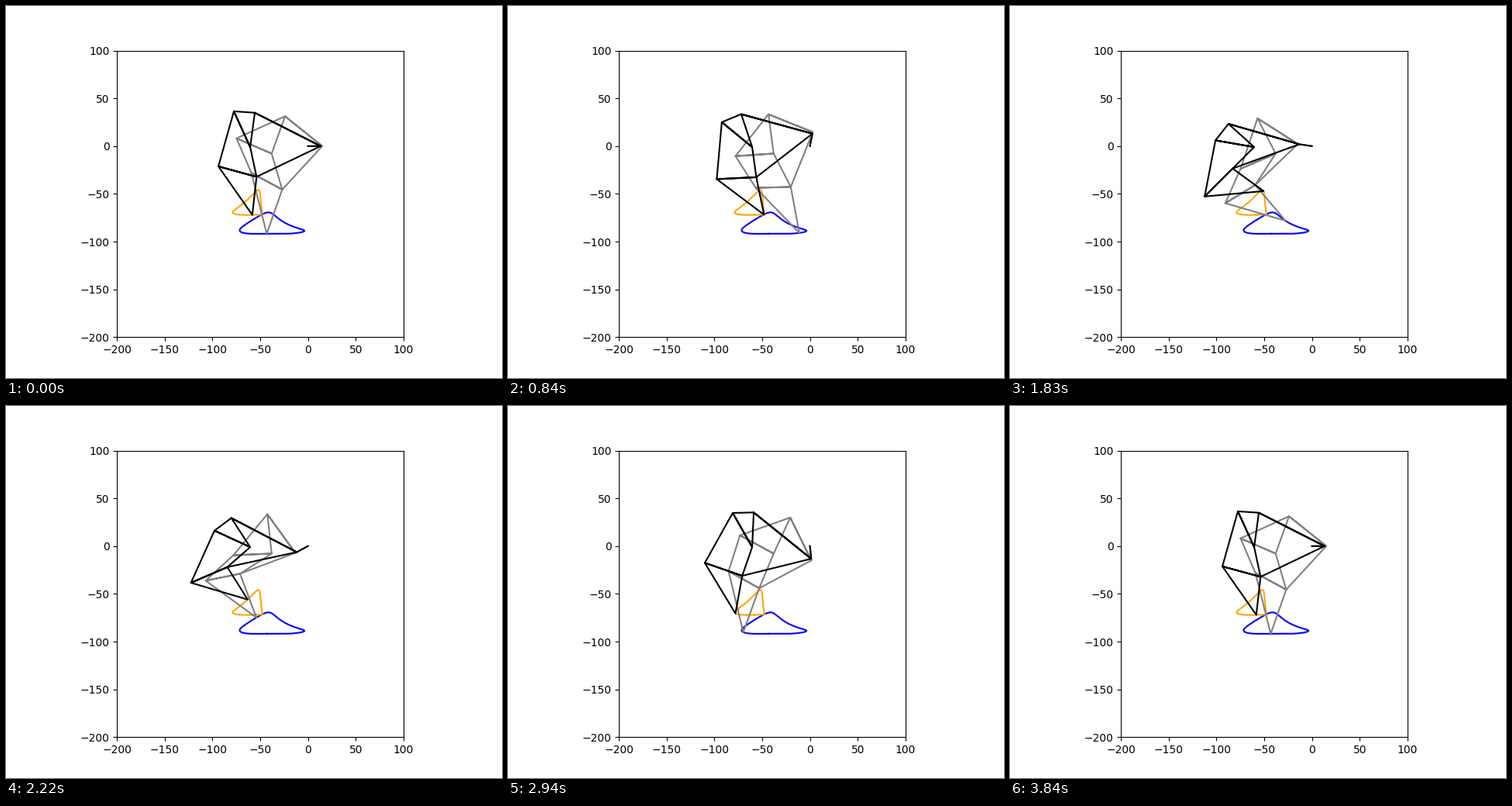
A matplotlib script for the animation above (3.87 s loop, 640 px wide and 480 px high).

```python
import numpy as np
import matplotlib.pyplot as plt
from matplotlib.animation import FuncAnimation

FRAMES = 129
INTERVAL = 30


def meet(p, q, rp, rq, side):
    """Point rp from p and rq from q; side +1 lies left of p->q, -1 right."""
    v = q - p
    d = np.hypot(*v)
    along = (rp**2 - rq**2 + d**2) / (2 * d)
    off = np.sqrt(rp**2 - along**2)
    u = v / d
    return p + along * u + side * off * np.array([-u[1], u[0]])


class Leg:
    """Crank-driven leg linkage, described by its pivot and bar lengths."""

    def __init__(self, pivot, crank, **bars):
        self.pivot = np.array(pivot)
        self.crank = crank
        self.bars = bars

    def joints(self, angle):
        n, pivot = self.bars, self.pivot
        tip = self.crank * np.array([np.cos(angle), np.sin(angle)])
        top = meet(pivot, tip, n["b"], n["j"], 1)
        left = meet(pivot, top, n["d"], n["e"], 1)
        knee = meet(pivot, tip, n["c"], n["k"], -1)
        heel = meet(left, knee, n["f"], n["g"], -1)
        foot = meet(heel, knee, n["h"], n["i"], -1)
        return tip, top, left, knee, heel, foot

    def outline(self, angle):
        tip, top, left, knee, heel, foot = self.joints(angle)
        p = self.pivot
        return np.array([np.zeros(2), tip, top, p, left, top, tip, knee, p,
                         left, heel, knee, foot, heel, knee]).T

    def trace(self, angles):
        return np.array([self.joints(a)[-1] for a in angles]).T


classic = Leg((-38, -7.8), 15, b=41.5, c=39.3, d=40.1, e=55.8, f=39.4,
              g=36.7, h=65.7, i=49, j=50, k=61.9)
compact = Leg((-60.5, -1), 13.3, b=36.3, c=31.85, d=41.15, e=22, f=59.9,
              g=41.45, h=61.95, i=40.1, j=77.3, k=74.4)

angles = np.linspace(0, 2 * np.pi, FRAMES)

fig, ax = plt.subplots(figsize=(6.4, 4.8), dpi=100)
ax.set_aspect("equal")
ax.set_xlim(-200, 100)
ax.set_ylim(-200, 100)

ax.plot(*classic.trace(angles), color="blue")
ax.plot(*compact.trace(angles), color="orange")
legs = [(classic, ax.plot([], [], color="gray")[0]),
        (compact, ax.plot([], [], color="black")[0])]


def update(i):
    for leg, line in legs:
        line.set_data(*leg.outline(angles[i]))
    return [line for _, line in legs]


anim = FuncAnimation(fig, update, frames=FRAMES, interval=INTERVAL,
                     repeat=True, repeat_delay=0)
plt.show()
```
